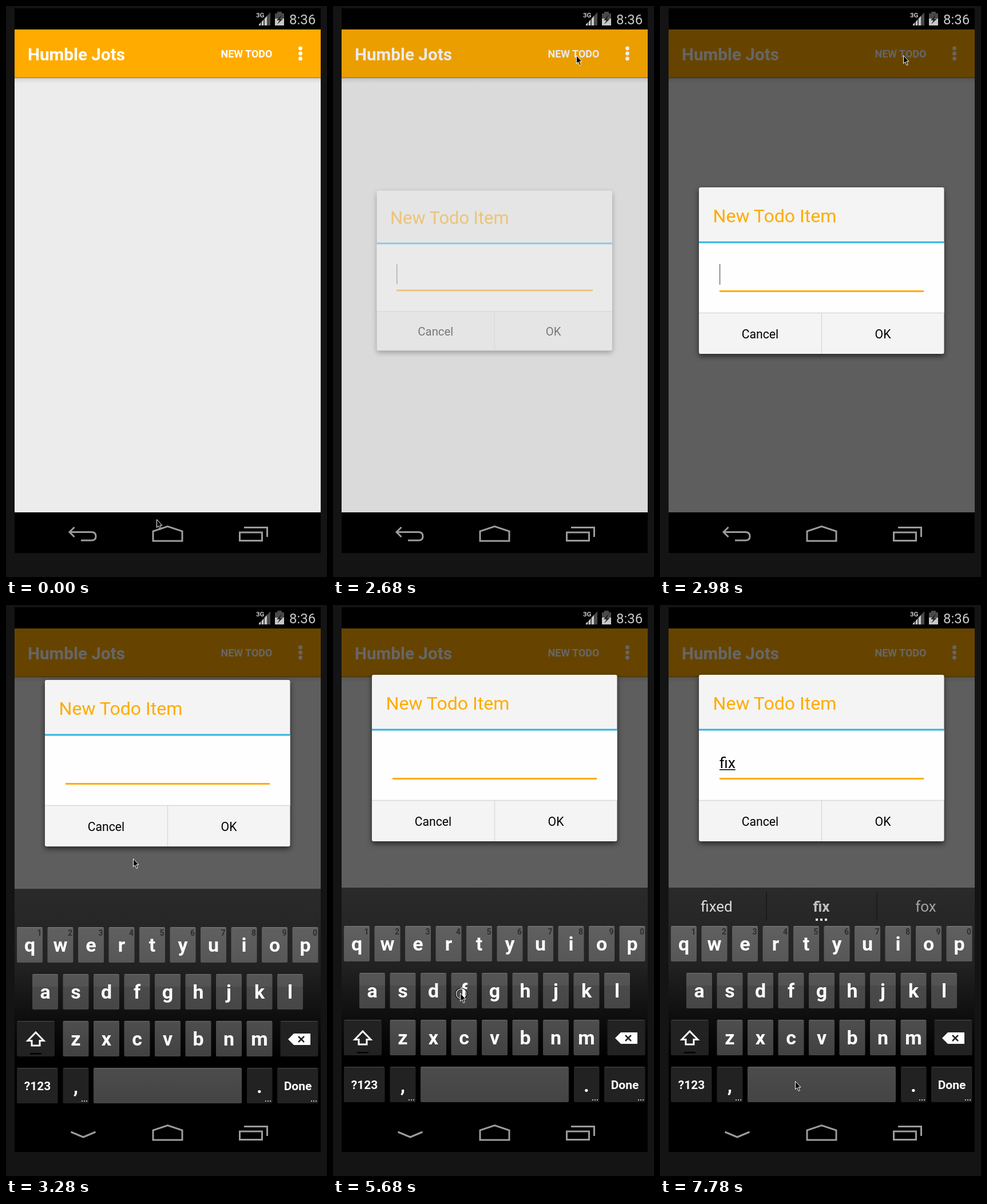
An HTML page for the animation above (8000 ms loop, 561 by 998 pixels).

```html
<!DOCTYPE html>
<html lang="en">
<head>
<meta charset="utf-8">
<title>Todo app</title>
<style>
  html, body { margin: 0; width: 100%; height: 100%; overflow: hidden; background: #141414; }
  svg { display: block; width: 100vw; height: 100vh; font-family: Roboto, sans-serif; }
  .bold { font-weight: 700; }
  .mid { text-anchor: middle; }
  .key { font-size: 34px; fill: #fff; }
  .fn { font-size: 21px; fill: #fff; }
  .hint { font-size: 14px; fill: #2e2e2e; text-anchor: end; }
  .word { font-size: 26px; fill: #ddd; }
  .icon { fill: none; stroke: #9c9c9c; stroke-width: 3; }
  #dialog { filter: drop-shadow(0 4px 5px rgba(0, 0, 0, .6)); }
</style>
</head>
<body>
<svg viewBox="0 0 561 998" preserveAspectRatio="none">
  <defs>
    <linearGradient id="barShade" x2="0" y2="1">
      <stop stop-color="#bcbcbc"/><stop offset=".35" stop-color="#dcdcdc"/><stop offset="1" stop-color="#e8e8e8"/>
    </linearGradient>
    <linearGradient id="board" gradientUnits="userSpaceOnUse" x1="0" x2="0" y1="494" y2="794">
      <stop stop-color="#2a2a2a"/><stop offset=".45" stop-color="#222"/>
      <stop offset=".75" stop-color="#0e0e0e"/><stop offset="1"/>
    </linearGradient>
    <linearGradient id="keyFill" gradientUnits="userSpaceOnUse" x1="0" x2="0" y1="561" y2="869">
      <stop stop-color="#606060"/><stop offset=".2" stop-color="#575757"/>
      <stop offset=".335" stop-color="#535353"/><stop offset=".34" stop-color="#4a4a4a"/>
      <stop offset=".47" stop-color="#464646"/><stop offset=".54" stop-color="#4e4e4e"/>
      <stop offset=".72" stop-color="#424242"/><stop offset=".8" stop-color="#4c4c4c"/>
      <stop offset="1" stop-color="#444"/>
    </linearGradient>
    <clipPath id="app"><rect x="15" y="41" width="535" height="844"/></clipPath>
  </defs>

  <rect width="561" height="998" fill="#141414"/>
  <rect x="15" y="4" width="535" height="952"/>

  <!-- status bar -->
  <text class="bold" x="437" y="20" font-size="11.5" fill="#c8c8c8">3G</text>
  <path d="M441 34L462 11V34Z" fill="#4a4a4a"/>
  <path d="M442 34V32L445 29V34ZM447 34V27.500L450 24V34ZM452 34V22L456 17.500V34Z" fill="#c8c8c8"/>
  <path d="M474 10H482V13H486V34H470V13H474Z" fill="#4a4a4a"/>
  <path d="M470 22H486V34H470Z" fill="#c8c8c8"/>
  <path d="M482 15L473 25H478L474 32L484 22.500H479Z" fill="#222"/>
  <text x="495" y="32" font-size="24" fill="#cacaca">8:36</text>

  <!-- app -->
  <rect x="15" y="41" width="535" height="844" fill="#ececec"/>
  <rect x="15" y="125" width="535" height="9" fill="url(#barShade)"/>
  <rect x="15" y="41" width="535" height="84" fill="#ffab00"/>
  <rect x="15" y="124.500" width="535" height="1.500" fill="#b9872c"/>
  <g fill="#fff">
    <text class="bold" x="38" y="94.500" font-size="29.700">Humble Jots</text>
    <text class="bold" x="375.500" y="90" font-size="18">NEW TODO</text>
    <circle cx="514.500" cy="74" r="3.400"/><circle cx="514.500" cy="83" r="3.400"/><circle cx="514.500" cy="92" r="3.400"/>
  </g>
  <rect id="dim" x="15" y="41" width="535" height="844"/>

  <!-- dialog, drawn from its own top edge -->
  <g id="dialog">
    <rect x="68" width="428.500" height="291" rx="3" fill="#f4f4f4"/>
    <rect x="68" y="97" width="428.500" height="122" fill="#fefefe"/>
    <rect x="68" y="94.500" width="428.500" height="3" fill="#2fb4e3"/>
    <path d="M68 219.500H496.500M282.500 220V291" stroke="#d8d8d8" stroke-width="1.300"/>
    <text x="92.500" y="60.500" font-size="32.100" fill="#ffab00">New Todo Item</text>
    <rect x="104" y="180" width="357" height="3" fill="#ffab00"/>
    <text class="mid" x="175" y="264" font-size="21.200">Cancel</text>
    <text class="mid" x="389.500" y="264" font-size="21.200">OK</text>
    <text id="typed" x="104" y="162.500" font-size="26.500"></text>
    <rect id="under" x="104" y="165" height="1.600"/>
    <rect id="caret" y="134" width="1.200" height="36" fill="#555"/>
  </g>

  <!-- keyboard -->
  <g clip-path="url(#app)"><g id="keyboard">
    <rect x="15" y="494" width="535" height="460" fill="url(#board)"/>
    <g id="words">
      <path d="M186 502V551M379 502V551" stroke="#191919" stroke-width="1.500"/>
      <text class="word mid" x="99" y="536"></text>
      <text class="word mid bold" x="282" y="536" style="fill:#c0c0c0"></text>
      <text class="word mid" x="464.500" y="536" style="fill:#a4a4a4"></text>
      <path d="M272 548h4v4h-4zM280 548h4v4h-4zM288 548h4v4h-4z" fill="#eee"/>
    </g>
    <g id="keys"></g>
    <path d="M52 745L66 759.500H59V768H45V759.500H38Z" fill="none" stroke="#fff" stroke-width="3"/>
    <rect x="42" y="781" width="20" height="2.500"/>
    <path d="M493 757L503 747H532V767H503Z" fill="#fff"/>
    <path d="M511 752L521 762M521 752L511 762" stroke="#222" stroke-width="2.500"/>
  </g></g>

  <!-- navigation -->
  <g class="icon">
    <path id="back" d="M119.500 911L111 919.500L119.500 928M111 919.500H149.500Q157 919.500 157 927Q157 934 149.500 934H131"/>
    <path id="hide" d="M113.500 921L135 930L156.500 921"/>
    <path d="M257 935V918L282.500 909.500L308 918V935Z"/>
    <path d="M408.500 920H447.500V934.500H408.500ZM416 911.500H456.500V928"/>
  </g>

  <g id="pointer">
    <g id="ring" fill="none">
      <circle cx="2" cy="1.500" r="9" stroke="#fff" stroke-width="1.300"/>
      <circle cx="2" cy="1.500" r="10" stroke="#000" stroke-width="1.200"/>
    </g>
    <path d="M.5 .5V14.500L3.600 11.600L6 17.500L8.300 16.500L6 10.800H10Z" stroke="#fff"/>
  </g>
</svg>
<script>
const $ = id => document.getElementById(id);
const LOOP = 8000;

// --- keys ---
const PITCH = 53.5;
const parts = [];
const label = (cls, x, y, text) => parts.push(`<text class="bold ${cls}" x="${x}" y="${y}">${text}</text>`);
function key(x, y, w, dark) {
  parts.push(`<rect x="${x}" y="${y}" width="${w}" height="62" rx="2" fill="${dark ? '#222' : 'url(#keyFill)'}"/>`,
    `<rect x="${x + 1}" y="${y}" width="${w - 2}" height="1.2" fill="#fff" opacity=".16"/>`);
}
function more(x) {
  for (let i = 0; i < 3; i++) parts.push(`<rect x="${x + i * 4}" y="864" width="2" height="2" fill="#bbb"/>`);
}
[['qwertyuiop', 19, 561], ['asdfghjkl', 46, 643], ['zxcvbnm', 99.5, 725]].forEach(([letters, x0, y], row) =>
  [...letters].forEach((c, i) => {
    const x = x0 + i * PITCH;
    key(x, y, 45);
    label('key mid', x + 22.5, y + 43, c);
    if (!row) label('hint', x + 43.5, y + 15, (i + 1) % 10);
  }));
key(19, 725, 66, true);
key(479.5, 725, 66, true);
key(19, 807, 71.5, true);
key(99.5, 807, 45, true);
key(153, 807, 259);
key(421, 807, 44.5, true);
key(474, 807, 71.5, true);
label('fn mid', 55, 846, '?123');
label('fn mid', 510, 846, 'Done');
label('key mid', 122, 851, ',');
label('key mid', 443, 851, '.');
[132, 453, 533].forEach(more);
$('keys').innerHTML = parts.join('');

// --- timeline: [time, values...] ---
const pointerPath = [
  [0, 263, 897], [150, 270, 870], [450, 320, 650], [750, 395, 330], [1030, 445, 125], [1180, 449, 95],
  [1630, 425, 87], [2980, 425, 86], [3280, 222, 443], [3430, 218, 520], [3880, 222, 630], [4630, 222, 630],
  [5380, 222, 678], [5830, 222, 678], [6130, 414, 592], [6280, 390, 615], [6580, 178, 768],
  [7030, 178, 768], [7480, 233, 838], [7780, 236, 832]
];
const dialogPath = [ // top, scale, opacity, dim
  [2530, 317, .9, 0, 0], [2680, 317, .96, .45, .08], [2830, 317, .992, .95, .24], [2980, 317, 1, 1, .6],
  [3130, 240, 1, 1, .6], [3280, 131, 1, 1, .6], [3430, 122, 1, 1, .6]
];
const boardPath = [[2980, 120, 0], [3130, 60, .5], [3280, 2, 1], [3430, 0, 1]]; // shift, opacity
const clicks = [1930, 5680, 6130, 6880];
const blinks = [2680, 3280, 3730, 4180, 4780, 5230, 5830, 6880, 7030, 7480];
const typing = [
  [0, '', '', ''],
  [5830, 'f', 'for', 'from'],
  [6280, 'fi', 'find', 'first'],
  [7030, 'fix', 'fixed', 'fox']
];

function at(path, t) {
  const n = path.findIndex(p => p[0] > t);
  if (n < 0) return path[path.length - 1].slice(1);
  if (!n) return path[0].slice(1);
  const a = path[n - 1], b = path[n], k = (t - a[0]) / (b[0] - a[0]);
  return a.slice(1).map((v, i) => v + (b[i + 1] - v) * k);
}

// The screen refreshes every 150 ms, with one short refresh early on.
function tick(t) {
  const lag = t < 1030 ? 0 : 130;
  return Math.min(7780, Math.floor((t - lag) / 150) * 150 + lag);
}

const slots = $('words').querySelectorAll('text');
let shown = -1;

function draw(t) {
  const [px, py] = at(pointerPath, t);
  $('pointer').setAttribute('transform', `translate(${px} ${py})`);
  $('ring').style.display = clicks.some(c => t >= c && t < c + 150) ? '' : 'none';

  const [top, scale, alpha, dim] = at(dialogPath, t);
  $('dialog').setAttribute('transform',
    `translate(282.5 ${top + 145.5}) scale(${scale}) translate(-282.5 -145.5)`);
  $('dialog').style.opacity = alpha;
  $('dim').style.opacity = dim;

  const [shift, solid] = at(boardPath, t);
  $('keyboard').setAttribute('transform', `translate(0 ${shift})`);
  $('keyboard').style.opacity = solid;
  $('back').style.display = solid ? 'none' : '';
  $('hide').style.display = solid ? '' : 'none';

  const [, text, left, right] = typing.filter(s => s[0] <= t).pop();
  $('typed').textContent = text;
  [left, text, right].forEach((w, i) => slots[i].textContent = w);
  $('words').style.display = text ? '' : 'none';
  const width = text ? $('typed').getComputedTextLength() : 0;
  $('under').setAttribute('width', width);
  $('caret').setAttribute('x', 104 + width);
  $('caret').style.display = blinks.filter(b => b <= t).length % 2 ? '' : 'none';
}

function frame() {
  const t = tick(performance.now() % LOOP);
  if (t !== shown) draw(shown = t);
  requestAnimationFrame(frame);
}
frame();
</script>
</body>
</html>
```
